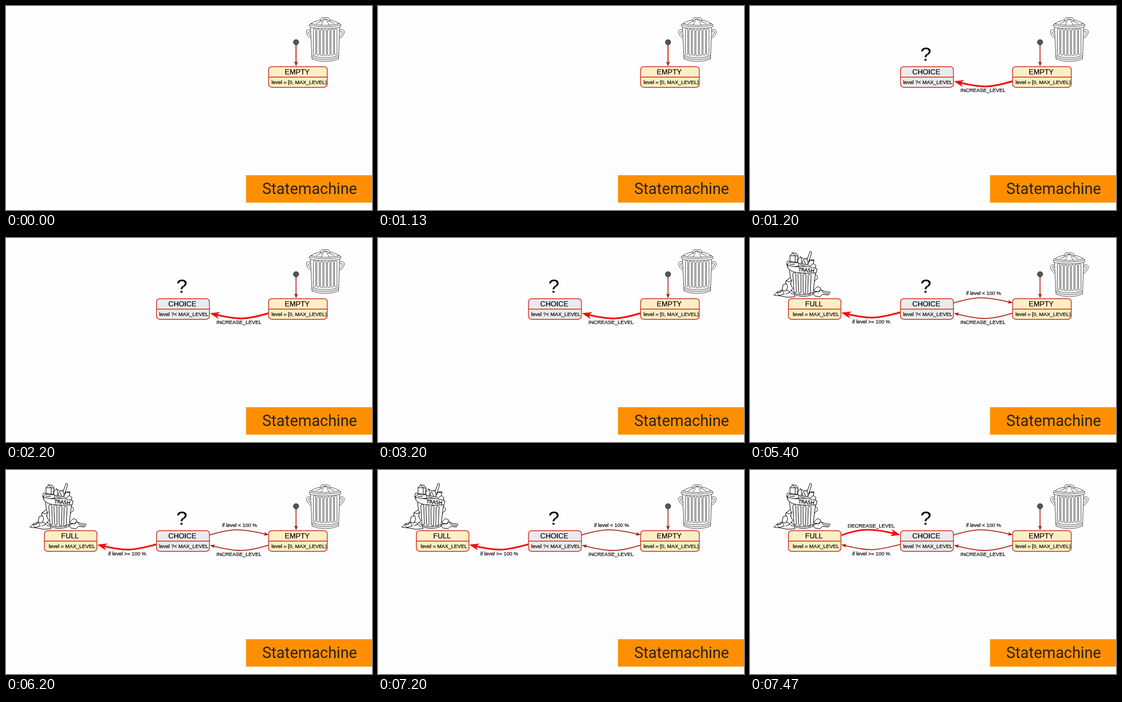
An HTML page for the animation above (8000 ms loop, 640 by 358 pixels).

```html
<!DOCTYPE html>
<html lang="en">
<head>
<meta charset="utf-8">
<title>Statemachine</title>
<style>
html, body { margin: 0; height: 100%; overflow: hidden; background: #fefdff; }
svg { display: block; width: 100vw; height: 100vh; }
text { font: 9px "Liberation Sans", Arial, sans-serif; fill: #000; stroke: #000; stroke-width: .18; }
.title { font-size: 12.6px; text-anchor: middle; }
.ask { font-size: 34px; text-anchor: middle; }
.banner { font: 27px Roboto, sans-serif; fill: #262223; stroke: none; }
.box { stroke: #cf3420; stroke-width: 1.4; }
.arrow { fill: none; stroke: #a5190c; stroke-width: 1.45; marker-end: url(#thin); }
.hot .arrow { stroke: #f60808; stroke-width: 2.9; marker-end: url(#thick); }
.hot .arrow.start { stroke: #bd2410; stroke-width: 1.8; marker-end: url(#start); }
.can { fill: #fefdff; stroke: #444; stroke-width: .9; stroke-linejoin: round; }
.trash { fill: #fefdff; stroke: #111; stroke-width: 1; stroke-linejoin: round; stroke-linecap: round; }
.trash text { font: 8.4px "DejaVu Sans", sans-serif; stroke-width: .3; }
.line { fill: none; }
</style>
</head>
<body>
<svg id="stage" viewBox="0 0 640 358" preserveAspectRatio="none"></svg>
<script>
const LOOP = 8000, FULL_AT = 5400;
const stage = document.getElementById('stage');

const label = (x, y, s, cls = '') =>
  `<text x="${x}" y="${y}" class="${cls}">${s.replace('<', '&lt;')}</text>`;
const path = (d, cls = '') => `<path d="${d}" class="${cls}"/>`;
const repeat = (n, draw) => Array.from({ length: n }, (_, i) => draw(i)).join('');

// Part shown from one time on; it is highlighted until "cool".
const part = (from, cool, body) => `<g data-from="${from}" data-cool="${cool}">${body}</g>`;

const state = (x, w, fill, name, rule, tx) => `<g class="box" fill="${fill}">
  <rect x="${x}" y="106.5" width="${w}" height="36.2" rx="5.5"/>
  <path d="M${x} 124.8h${w}"/></g>` +
  label(x + w / 2 - 1.2, 120, name, 'title') + label(tx, 136.5, rule);

// The line stops 6 px before the tip; the marker covers the rest.
function arrow(x0, y0, x1, y1, x2, y2, x3, y3, cls = '') {
  const k = 6 / Math.hypot(x3 - x2, y3 - y2);
  const ex = x3 - (x3 - x2) * k, ey = y3 - (y3 - y2) * k;
  return path(`M${x0} ${y0}C${x1} ${y1} ${x2} ${y2} ${ex} ${ey}`, 'arrow ' + cls);
}

const head = (id, len, half, notch, color) => `<marker id="${id}" orient="auto"
  markerUnits="userSpaceOnUse" markerWidth="40" markerHeight="40" refX="-6" overflow="visible">
  <path d="M0 0L${-len} ${-half}L${-notch} 0L${-len} ${half}Z" fill="${color}"/></marker>`;

const emptyCan = '<g id="can" class="can">' +
  path('M533 42Q525 40 525.500 46Q527 54 535 57L535 54Q530 51 528.500 46Q529 44 533 45.500Z') +
  path('M583 42Q592 40 591.500 46Q590 54 582 57L582 54Q587 51 588.500 46Q588 44 583 45.500Z') +
  path('M532.500 37L535 93Q558 102 581.500 93L583.500 37Z') +
  repeat(7, i => {
    const x = 537.4 + i * 6.2, drop = 2.8 - Math.abs(i - 3) * .7;
    return `<rect x="${x}" y="${39 + drop}" width="4.2" height="46" rx="2.1"/>`;
  }) +
  path('M534.500 87Q558 95 582 87M534.500 90Q558 98.500 582 90', 'line') +
  path('M533 31Q530 32 530 34.500Q530 37 535 38Q558 42 581 38Q586 37 586 34.500Q586 32 583 31Z') +
  path('M531 33.500Q558 40 585 33.500', 'line') +
  path('M533 31Q543 24 558 24T583 31Q558 37 533 31Z') +
  path('M542 31L552 26M551 33L555 26M565 33L561 26M574 31L564 26', 'line') +
  path('M550 26Q549 21 554 20.500H562Q567 21 566 26L563 26Q563 23 558 23T553 26Z') + '</g>';

const fullCan = '<g class="trash">' +
  // heap
  path('M67 53L64 46L66 40L71 42L75 38L81 40L88 33L94 37L103 35L104 39L112 38L110 44L115 48L114 57L86 55Z') +
  path('M70 41V31L74 26L81 27L84 32L83 42ZM70 31L79 31L84 32M79 31V41M74 26L79 31') +
  path('M99 40L105 23.500L108 25L103 41Z') +
  path('M84 44Q82 36 89 33Q91 39 90 45ZM91 45Q93 36 98 36Q103 41 101 47Z') +
  path('M101 46L105 39L112 40L110 46L105 49ZM65 47Q70 40 76 44L84 43L86 49L75 51Z') +
  path('M70 46L78 47M95 40L97 46M88 47L98 50', 'line') +
  // body
  path('M69 53L73 97Q91 107 110 99L115 57Z') +
  repeat(4, i => {
    const x = 75 + i * 9, lean = 1.2 - i;
    return path(`M${x} ${62 + i}q2.500 -3 5 0l${lean} 33q-2.500 2 -4 0z`);
  }) +
  path('M73 95Q91 104 110 96', 'line') +
  path('M66 47Q76 52 88 50Q104 49 117 54L116 61Q102 63 88 61Q74 61 67 54Z') +
  '<text x="84.500" y="58" transform="rotate(5 84 58)">TRASH</text>' +
  path('M114 64Q120 66 117 72L112 76', 'line') +
  // litter on the ground
  path('M42 100L47 95L53 96L56 91L62 92L67 88L76 96L79 103L66 104L55 102Z') +
  path('M61 88L63 75L70 70L73 74L71 81L75 89L69 94ZM63 75L69 77L73 74') +
  path('M56 91L58 82L64 80L66 86L63 93Z') +
  path('M47 95L56 92L60 98L51 101ZM63 98L70 95L75 100', 'line') +
  path('M111 98L114 93L120 95L125 91L131 94L140 95L137 100L127 99L122 103L114 102Z') +
  path('M112 91L118 85L124 88L121 94L114 95ZM125 91L128 96L137 98', 'line') + '</g>';

stage.innerHTML = '<defs>' + head('thin', 9, 3.3, 6.5, '#a5190c') +
  head('start', 9, 3.6, 6.5, '#bd2410') + head('thick', 17, 6.2, 12.5, '#f60808') + '</defs>' +
  '<rect width="640" height="358" fill="#fefdff"/>' +
  '<rect x="419.700" y="297" width="221" height="48" fill="#ff8f00"/>' +
  label(448, 329.5, 'Statemachine', 'banner') +
  emptyCan +
  state(459.2, 102.6, '#fcefc5', 'EMPTY', 'level = [0, MAX_LEVEL)', 464.3) +
  part(0, 1200, arrow(507.2, 68, 507.2, 80, 507.2, 92, 507.2, 106, 'start') +
    '<circle cx="507.200" cy="63.600" r="4.600" fill="#555" stroke="#333"/>') +
  part(1200, 4130,
    state(263.3, 92.4, '#ebebed', 'CHOICE', 'level ?< MAX_LEVEL', 267.8) +
    label(307.5, 95.8, '?', 'ask') +
    arrow(459, 132, 420, 144, 405, 144, 356.5, 132) +
    label(368, 150.7, 'INCREASE_LEVEL')) +
  part(3330, FULL_AT,
    arrow(356, 114, 393, 103, 408, 101.5, 459.5, 114) + label(377.7, 100.2, 'if level < 100 %')) +
  part(FULL_AT, 7470,
    fullCan + state(67.2, 91.8, '#fcefc5', 'FULL', 'level = MAX_LEVEL', 74.8) +
    arrow(262.5, 130.5, 222, 142, 208, 143, 159.5, 131) +
    label(178.8, 149.5, 'if level >= 100 %')) +
  part(7470, LOOP,
    arrow(160, 114.5, 192, 102.5, 212, 101.5, 263, 114) + label(170.8, 100.7, 'DECREASE_LEVEL'));

const parts = [...stage.querySelectorAll('[data-from]')];
const can = document.getElementById('can');
const begin = performance.now();

function draw(now) {
  const t = Math.max(0, now - begin) % LOOP;
  for (const p of parts) {
    p.style.display = t < +p.dataset.from ? 'none' : '';
    p.classList.toggle('hot', t < +p.dataset.cool);
  }
  can.setAttribute('transform', `translate(0 ${t < FULL_AT ? 0 : 5.5})`);
  requestAnimationFrame(draw);
}
draw(begin);
</script>
</body>
</html>
```
